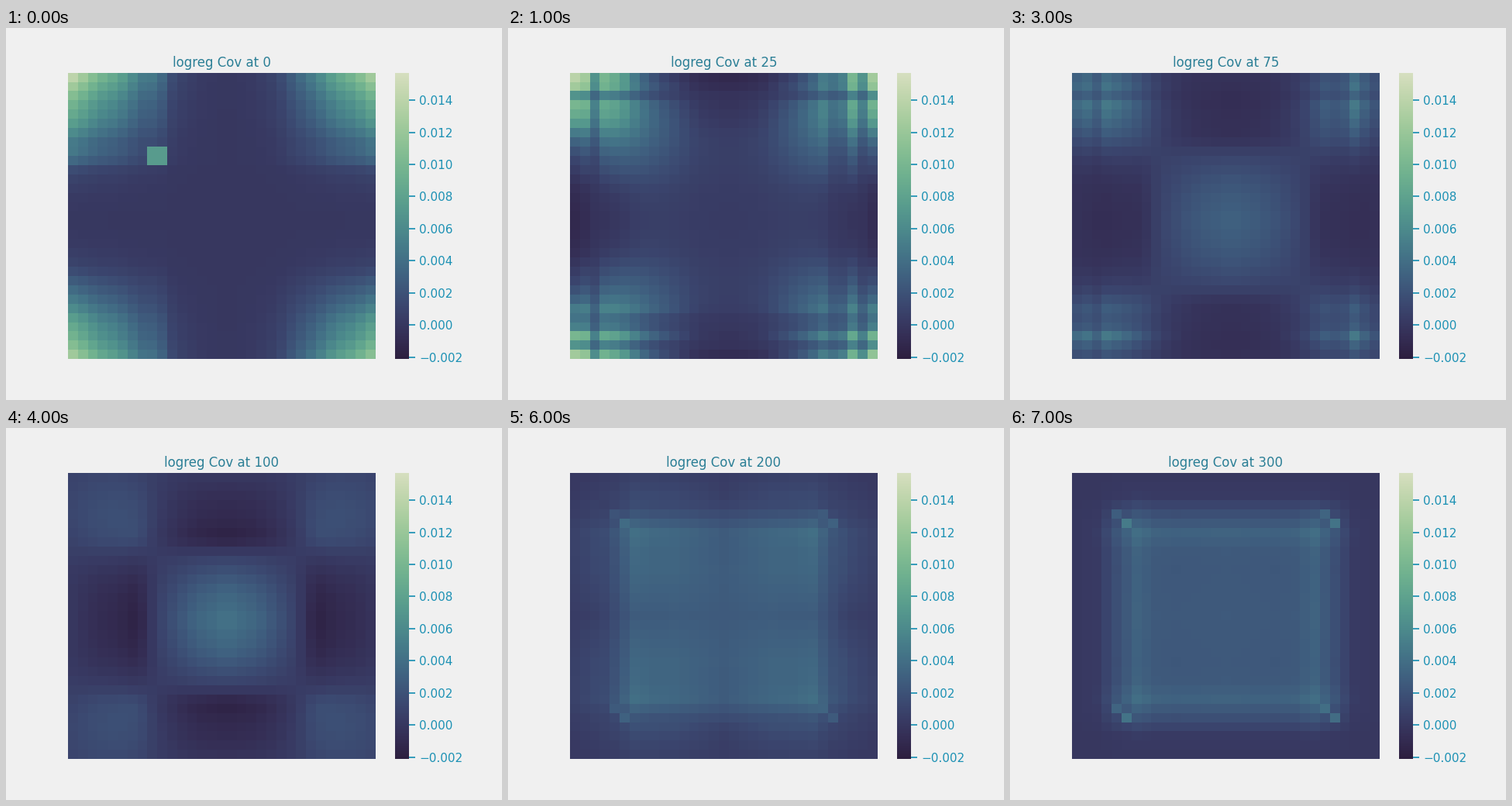
Recreate the animation shown at these times as a matplotlib script. Size 640 by 480 pixels, loop 8 s.

```python
import numpy as np
import matplotlib.pyplot as plt
from matplotlib.animation import FuncAnimation
from matplotlib.colors import ListedColormap

N = 31
VMIN, VMAX = -0.002117, 0.015713
STEPS = [0, 25, 50, 75, 100, 150, 200, 300]
BACK, TITLE, TICK = "#f0f0f0", "#2b7f96", "#1c91b4"

RADII = [0, 3, 5, 7, 9, 11, 13, 15.5]
WEAK = [2, 26, 27, 29]  # variables with a low share in the early modes


def cubehelix(start=0.5, rot=-0.75, hue=0.8, low=0.15, high=0.85):
    x = np.linspace(low, high, 256)
    amp = hue * x * (1 - x) / 2
    phi = 2 * np.pi * (start / 3 + rot * x)
    weights = [(-0.14861, 1.78277), (-0.29227, -0.90649), (1.97294, 0)]
    rgb = [x + amp * (a * np.cos(phi) + b * np.sin(phi)) for a, b in weights]
    return ListedColormap(np.clip(np.transpose(rgb), 0, 1))


def mode(*keys, center=15.5, weak=1):
    """Symmetric profile over the variables, keyed by distance to the center."""
    m = np.interp(abs(np.arange(N) - center), RADII, keys)
    m[WEAK] *= weak
    return m


def cov(*modes):
    return sum(np.outer(m, m) for m in modes)


def cov_start():
    m = mode(0, .1, .28, .85, 1.45, 2.2, 2.65, 3.75)
    m[8:10] += .25
    c = cov(m)
    c[8:10, 8:10] = 7.4
    return c


def cov_25():
    return cov(mode(0, .15, .6, 1.1, 1.75, 2.7, 2.95, 3.15, weak=.6),
               mode(.57, .68, .88, 1.05, .9, .1, -.6, -2, weak=.6))


def cov_50():
    outer = mode(0, .03, .12, .45, 1.2, 2.2, 3, 2.2, weak=.6)
    outer[-1] *= .4
    inner = mode(1.38, 1.3, 1.25, 1, .5, 0, -.45, -.6, center=15.7)
    return cov(outer, inner)


def cov_100():
    return cov(mode(0, 0, .15, .5, 1, 1.25, 1.2, 1),
               mode(2.1, 1.65, 1.05, .4, -.85, -.55, -.4, 0))


def cov_150():
    return cov(mode(1.5, 1.85, 2.05, 2, 1.8, 1, .6, .3, center=15),
               mode(-.6, -.1, .2, .45, .95, .55, .4, .2, center=15))


def cov_300():
    c = cov(mode(1.6, 1.57, 1.55, 1.6, 2, 1.15, .2, 0, center=15))
    for i in (4, 5):
        corners = (i, i + 21)
        c[np.ix_(corners, corners)] += i - 2.5
    return c


def build():
    c50, c100, c150, c300 = cov_50(), cov_100(), cov_150(), cov_300()
    c200 = c150.copy()
    core = np.s_[3:27, 3:27]
    c200[core] = (c150[core] + c300[core]) / 2
    mats = [cov_start(), cov_25(), c50, (c50 + c100) / 2, c100, c150, c200, c300]
    return [m / 1000 for m in mats]


mats = build()
fig, ax = plt.subplots(figsize=(6.4, 4.8), dpi=100, facecolor=BACK)
mesh = ax.pcolormesh(mats[0], cmap=cubehelix(), vmin=VMIN, vmax=VMAX)
ax.set(xlim=(0, N), ylim=(N, 0), xticks=[], yticks=[])
for spine in ax.spines.values():
    spine.set_visible(False)

bar = fig.colorbar(mesh, ax=ax)
bar.outline.set_visible(False)
values = np.arange(-2, 15, 2) / 1000
bar.set_ticks(values, labels=[f"{v:.3f}".replace("-", "\u2212") for v in values])
bar.ax.tick_params(length=6, width=1.25, pad=3.5, color=TICK,
                   labelcolor=TICK, labelsize=11)
title = ax.set_title("", fontsize=12, color=TITLE, pad=5.28)


def draw(k):
    mesh.set_array(mats[k])
    title.set_text(f"logreg Cov at {STEPS[k]}")
    return mesh, title


anim = FuncAnimation(fig, draw, frames=len(STEPS), interval=1000, repeat=True)
plt.show()
```
